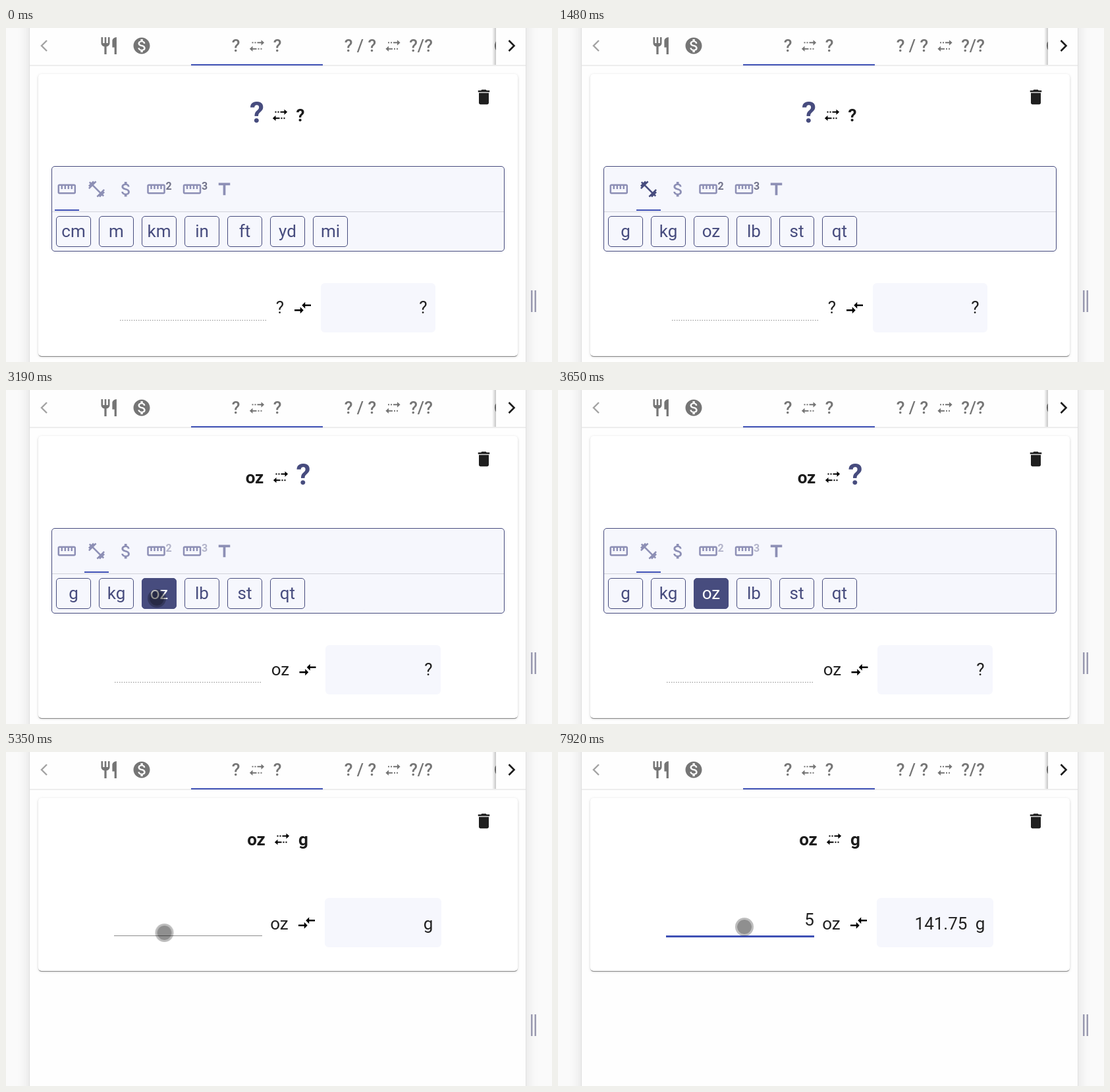
Animation, 829 px wide and 508 px high, one loop 8000 ms. Source, as an HTML page:

```html
<!DOCTYPE html>
<html lang="en">
<head>
<meta charset="utf-8">
<title>Unit converter</title>
<style>
:root { --ink: #474c7e; --pale: #8d8fb5; --accent: #3f51b5; --tint: #f6f7fd; }
@property --slide { syntax: "<number>"; inherits: true; initial-value: 0; }
html, body { margin: 0; width: 100%; height: 100%; overflow: hidden; background: #fafafa; }
body { position: relative; font: 26px Roboto, sans-serif; }
div, body > svg { position: absolute; box-sizing: border-box; }
body > svg { left: 0; top: 0; }
text { text-anchor: middle; fill: #212121; }
.tabs text { font-weight: 500; fill: #757575; }
.title text { font-weight: 700; fill: #1c1c1c; }
.title .big { font-size: 44px; fill: var(--ink); }

.page { left: 35px; top: -40px; width: 755px; height: 600px; background: #fefefe;
  border: 1px solid #e0e0e0; box-shadow: 0 0 18px rgba(0,0,0,.11); }
.card { left: 49px; top: 70px; width: 728px; height: 429px; border-radius: 5px; background: #fff;
  box-shadow: 0 2px 1px -1px rgba(0,0,0,.3), 0 1px 1px rgba(0,0,0,.2), 0 1px 4px rgba(0,0,0,.14); }
.panel { left: 69px; top: 210px; width: 688px; height: 130px; overflow: hidden;
  border: 1px solid var(--ink); border-radius: 5px; background: var(--tint); }
.rule { left: 0; top: 68px; width: 100%; height: 1px; background: #d2d3db; }
.bar { left: 4px; top: 65px; width: 37px; height: 2px; background: var(--accent);
  transform: translateX(calc(var(--slide) * 45px)); }
.press { left: 49px; top: 4px; width: 37px; height: 60px; background: #dcdce2; opacity: 0; }
.units { left: 6px; top: 75px; display: flex; gap: 12px;
  transform: translateX(calc((var(--from) - var(--slide)) * 686px)); }
.units span { box-sizing: border-box; width: 53px; height: 47px; border: 1px solid var(--ink);
  border-radius: 5px; color: var(--ink); line-height: 45px; text-align: center; }
.weight { color: var(--pale); }
.power { font-size: 16px; font-weight: 700; fill: #74758c; }
.focus { transform-origin: 276.5px 280px; opacity: 0; }
.cursor { left: -14px; top: -14px; width: 28px; height: 28px; border-radius: 50%; opacity: 0;
  border: 3px solid rgba(0,0,0,.26); background: rgba(0,0,0,.44) padding-box; }
.pick, .result, .caret { opacity: 0; }

body, .card, .press, .units .chosen, .weight, .power, .first, .second, .third, .setup, .focus, .caret, .result, .cursor {
  animation: 8s step-end infinite; }
body { animation-name: slide; }
.card { animation-name: card; }
.press { animation-name: press; }
.units .chosen { animation-name: chosen; }
.weight { animation-name: weight; }
.power { animation-name: power; }
.first { animation-name: first; }
.second { animation-name: second; }
.third { animation-name: third; }
.setup { animation-name: setup; }
.focus { animation-name: focus; }
.caret { animation-name: caret; }
.result { animation-name: result; }
.cursor { animation-name: show, move; }

/* 1% is 80 ms */
@keyframes slide {
  0%, 6.125% { --slide: 0 } 7% { --slide: .029 } 7.875% { --slide: .227 } 8.875% { --slide: .592 }
  9.75% { --slide: .8 } 10.75% { --slide: .928 } 11.75% { --slide: .986 } 12.625%, 100% { --slide: 1 }
}
@keyframes press { 0% { opacity: 0 } 6.125% { opacity: .5 } 7% { opacity: 1 } 11.75% { opacity: .6 } 12.625% { opacity: .3 } 13.625%, 100% { opacity: 0 } }
@keyframes weight { 0% { color: var(--pale) } 6.125% { color: var(--ink) } 33.125%, 100% { color: var(--pale) } }
@keyframes power { 0% { fill: #74758c } 33.125%, 100% { fill: #b4b5cb } }
@keyframes chosen { 0% { background: transparent; color: var(--ink) } 33.125%, 100% { background: var(--ink); color: #fff } }
@keyframes card { 0% { height: 429px } 55.375%, 100% { height: 263px } }
@keyframes setup { 0% { opacity: 1 } 55.375%, 100% { opacity: 0 } }
@keyframes first { 0% { opacity: 1 } 33.125%, 100% { opacity: 0 } }
@keyframes second { 0% { opacity: 0 } 33.125% { opacity: 1 } 55.375%, 100% { opacity: 0 } }
@keyframes third { 0% { opacity: 0 } 55.375%, 100% { opacity: 1 } }
@keyframes focus {
  0% { opacity: 0; transform: scaleX(.5) } 72.625% { opacity: .3; transform: scaleX(.55) }
  73.625% { opacity: .8; transform: scaleX(.85) } 74.625% { opacity: 1; transform: scaleX(.96) }
  75.5% { opacity: 1; transform: scaleX(.991) } 76.5%, 100% { opacity: 1; transform: none }
}
@keyframes caret {
  0% { opacity: 0 } 72.625% { opacity: 1 } 79.5% { opacity: 0 } 86.25% { opacity: 1 } 96.125%, 100% { opacity: 0 }
}
@keyframes result { 0% { opacity: 0 } 90%, 100% { opacity: 1 } }
@keyframes show {
  0% { opacity: 0 } 6.125% { opacity: 1 } 18.5% { opacity: 0 } 21.375% { opacity: 1 } 42.75% { opacity: 0 }
  44.625% { opacity: 1 } 45.625% { opacity: 0 } 55.375% { opacity: 1 } 63% { opacity: 0 } 64.875%, 100% { opacity: 1 }
}
@keyframes move {
  0% { transform: translate(139px, 254px) }
  21.375% { transform: translate(184px, 278px); animation-timing-function: steps(4) }
  25.25% { transform: translate(225px, 306px); animation-timing-function: steps(4) }
  29.125% { transform: translate(242px, 316px) }
  39.875% { transform: translate(229px, 317px) }
  40.625% { transform: translate(198px, 315px) }
  41.75% { transform: translate(163px, 311px) }
  44.625% { transform: translate(133px, 315px) }
  55.375% { transform: translate(119px, 312px) }
  64.875% { transform: translate(214px, 282px); animation-timing-function: steps(4) }
  68.75% { transform: translate(267px, 268px) }
  99%, 100% { transform: translate(283px, 266px) }
}
</style>
</head>
<body>
<div class="page"></div>
<div class="card"></div>
<div class="panel setup">
  <div class="press"></div>
  <div class="rule"></div>
  <div class="bar"></div>
  <div class="units" style="--from:0"><span>cm</span><span>m</span><span>km</span><span>in</span><span>ft</span><span>yd</span><span>mi</span></div>
  <div class="units" style="--from:1"><span>g</span><span>kg</span><span class="chosen">oz</span><span>lb</span><span>st</span><span>qt</span></div>
</div>

<svg width="829" height="508" viewBox="0 0 829 508">
  <defs>
    <linearGradient id="edge"><stop stop-color="#000" stop-opacity="0"/><stop offset="1" stop-color="#000" stop-opacity=".22"/></linearGradient>
    <symbol id="ruler" viewBox="0 0 24 24"><path d="M21 6H3c-1.1 0-2 .9-2 2v8c0 1.1.9 2 2 2h18c1.1 0 2-.9 2-2V8c0-1.1-.9-2-2-2zm0 10H3V8h2v4h2V8h2v4h2V8h2v4h2V8h2v4h2V8h2v8z"/></symbol>
    <symbol id="compare" viewBox="0 0 24 24"><path d="M9 14H2v2h7v3l4-4-4-4v3zm6-1v-3h7V8h-7V5l-4 4 4 4z"/></symbol>
    <g id="swap">
      <g id="dash"><path d="M-7.5-5.7h2v2h-2zM-3.5-5.7h2v2h-2zM.5-5.7h6v-3.1l4.6 4.1-4.6 4.1v-3.1h-6z"/></g>
      <use href="#dash" transform="rotate(180)"/>
    </g>
  </defs>

  <g class="tabs" fill="#757575">
    <path d="M36 57h753" stroke="#dcdcdc"/>
    <path d="M281 55h200v2H281z" fill="#3f51b5"/>
    <path d="M62 19l-8 8 8 8" fill="none" stroke="#a3a3a3" stroke-width="2.4"/>
    <path transform="translate(140.6 11.4) scale(1.3)" d="M11 9H9V2H7v7H5V2H3v7c0 2.12 1.66 3.84 3.75 3.97V22h2.5v-9.03C11.34 12.84 13 11.12 13 9V2h-2v7zm5-3v8h2.5v8H21V2c-2.76 0-5 2.24-5 4z"/>
    <path transform="translate(191 12) scale(1.25)" d="M12 2C6.48 2 2 6.48 2 12s4.48 10 10 10 10-4.48 10-10S17.52 2 12 2zm1.41 16.09V20h-2.67v-1.93c-1.71-.36-3.16-1.46-3.27-3.4h1.96c.1 1.05.82 1.87 2.65 1.87 1.96 0 2.4-.98 2.4-1.59 0-.83-.44-1.61-2.67-2.14-2.48-.6-4.18-1.62-4.18-3.67 0-1.72 1.39-2.84 3.11-3.21V4h2.67v1.95c1.86.45 2.79 1.86 2.85 3.39H14.3c-.05-1.11-.64-1.87-2.22-1.87-1.5 0-2.4.68-2.4 1.64 0 .84.65 1.39 2.67 1.91s4.18 1.39 4.18 3.91c-.01 1.83-1.38 2.83-3.12 3.16z"/>
    <text x="349" y="36">?</text><use href="#swap" x="381" y="27"/><text x="412" y="36">?</text>
    <text x="538" y="36">? / ?</text><use href="#swap" x="587.5" y="27"/><text x="630" y="36">?/?</text>
    <circle cx="754.5" cy="27" r="12.5"/>
    <path d="M738 0h6v56h-6z" fill="url(#edge)"/>
    <path d="M744 0h45v56h-45z" fill="#fefefe"/>
    <path d="M763.500 19l8 8-8 8" fill="none" stroke="#1c1c1c" stroke-width="2.6"/>
  </g>

  <path d="M797 399h2.500v33h-2.500zM802.500 399h2.500v33h-2.500z" fill="#9a9ab0"/>
  <path transform="translate(710.500 90) scale(1.25)" fill="#1f1f1f" d="M6 19c0 1.100.9 2 2 2h8c1.100 0 2-.9 2-2V7H6v12zM19 4h-3.500l-1-1h-5l-1 1H5v2h14V4z"/>

  <g class="setup" fill="#8d8fb5">
    <use href="#ruler" x="77.300" y="230" width="30" height="30"/>
    <path class="weight" fill="currentColor" transform="translate(122.500 230) scale(1.25)" d="M20.570 14.860L22 13.430 20.570 12 17 15.570 8.430 7 12 3.430 10.570 2 9.140 3.430 7.710 2 5.570 4.140 4.140 2.710 2.710 4.140l1.430 1.430L2 7.710l1.430 1.430L2 10.570 3.430 12 7 8.430 15.570 17 12 20.570 13.430 22l1.430-1.430L16.290 22l2.140-2.140 1.430 1.430 1.430-1.430-1.430-1.430L22 16.290z"/>
    <path transform="translate(167.300 230.300) scale(1.25)" d="M11.800 10.900c-2.270-.59-3-1.200-3-2.150 0-1.090 1.010-1.850 2.700-1.850 1.780 0 2.440.85 2.500 2.100h2.210c-.07-1.720-1.120-3.300-3.210-3.810V3h-3v2.160c-1.940.42-3.500 1.680-3.500 3.610 0 2.310 1.910 3.460 4.700 4.130 2.500.6 3 1.480 3 2.410 0 .69-.49 1.790-2.700 1.790-2.060 0-2.870-.92-2.980-2.100h-2.200c.12 2.190 1.760 3.420 3.680 3.830V21h3v-2.150c1.950-.37 3.500-1.500 3.500-3.550 0-2.840-2.430-3.810-4.700-4.400z"/>
    <use href="#ruler" x="213" y="230" width="30" height="30"/><text class="power" x="247" y="246">2</text>
    <use href="#ruler" x="267.500" y="230" width="30" height="30"/><text class="power" x="301.500" y="246">3</text>
    <path transform="translate(316.500 230.500) scale(1.25)" d="M5 4v3h5.500v12h3V7H19V4H5z"/>
  </g>

  <g class="first">
    <g class="title"><text class="big" x="381" y="143.500">?</text><use href="#swap" x="416" y="132.500"/><text x="447" y="142">?</text></g>
    <path d="M173 444.500h223" stroke="#8c8c8c" stroke-dasharray="1.500 2"/>
    <rect x="478" y="388" width="174" height="75" rx="6" fill="#f6f7fd"/>
    <text x="416" y="434">?</text><use href="#compare" x="435.500" y="410.500" width="30" height="30"/><text x="633.500" y="434">?</text>
  </g>

  <g class="second">
    <g class="title"><text x="377.500" y="142">oz</text><use href="#swap" x="417" y="132.500"/><text class="big" x="451.500" y="143.500">?</text></g>
    <path d="M165 444.500h223" stroke="#8c8c8c" stroke-dasharray="1.500 2"/>
    <rect x="485" y="388" width="175" height="75" rx="6" fill="#f6f7fd"/>
    <text x="416.500" y="434">oz</text><use href="#compare" x="443" y="410.500" width="30" height="30"/><text x="641.500" y="434">?</text>
  </g>

  <g class="third">
    <g class="title"><text x="380" y="142">oz</text><use href="#swap" x="419" y="132.500"/><text x="451.500" y="142">g</text></g>
    <path d="M164 279.500h225" stroke="#8c8c8c"/>
    <path class="focus" d="M164 279h225v3H164z" fill="#3f51b5"/>
    <rect x="484" y="222" width="177" height="75" rx="6" fill="#f6f7fd"/>
    <text x="415" y="269.500">oz</text><use href="#compare" x="441.500" y="245" width="30" height="30"/><text x="641" y="269.500">g</text>
    <g class="result"><text x="381.500" y="263.500">5</text><text x="581.500" y="269.500">141.75</text></g>
    <path class="caret" d="M387 240h2v29h-2z" fill="#3f51b5"/>
  </g>
</svg>
<div class="cursor"></div>
</body>
</html>
```
